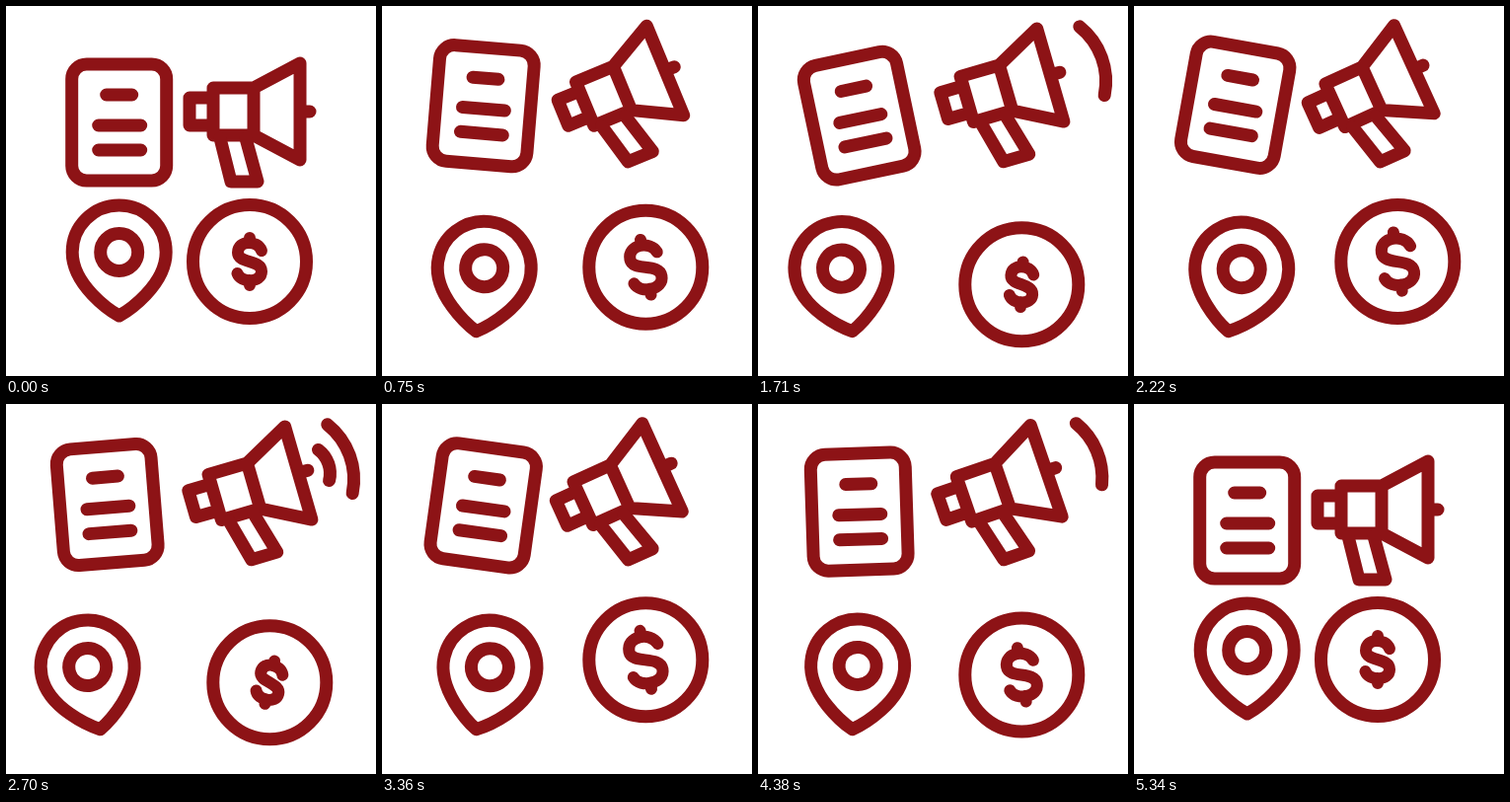
Animation of 375 by 375 pixels, one loop 5400 ms. Source, as an HTML page:

```html
<!DOCTYPE html>
<html lang="en">
<head>
<meta charset="utf-8">
<title>Marketing icons</title>
<style>
  html, body { margin: 0; width: 100%; height: 100%; overflow: hidden; background: #fff; }
  svg { display: block; width: 100vw; height: 100vh; }
  g { fill: none; stroke: #8d1316; stroke-width: 13; stroke-linecap: round; stroke-linejoin: round; }
  #sign path { vector-effect: non-scaling-stroke; stroke-width: 12; }
</style>
</head>
<body>
<svg viewBox="0 0 375 375">
  <g id="page">
    <rect x="-48" y="-59" width="96" height="118" rx="15"/>
    <path d="M-13 -28H13M-21 3H22M-21 28H22"/>
  </g>
  <g id="horn">
    <path d="M210 93H186V121H210M210 83H251V131H210ZM251 83L298 58V156L251 131M303 107H308"/>
    <path d="M217 134L228 178H255L243 134"/>
    <path id="near" d="M324 90A30 30 0 0 1 326 123" pathLength="100"/>
    <path id="far" d="M340 68A71 71 0 0 1 345 142" pathLength="100"/>
  </g>
  <g id="pin">
    <path d="M0 0C-9 -5 -47.5 -31 -47.5 -64.5A47.5 47.5 0 0 1 47.5 -64.5C47.5 -31 9 -5 0 0Z"/>
    <circle cy="-64.5" r="19"/>
  </g>
  <g id="coin">
    <circle r="57.5"/>
    <g id="sign">
      <path d="M12 -11C8 -22 -12 -22 -12 -9C-12 2 12 -2 12 10C12 22 -9 22 -12.5 12M0 -24V-19M0 19V24"/>
    </g>
  </g>
</svg>
<script>
const LOOP = 5400, STEP = 30;
const START = 460, PEAK = 1010, BEAT = 598;   // first push, first high point, half a swing
const LAST = PEAK + 5 * BEAT;                 // final low point

const el = id => document.getElementById(id);
const put = (id, value) => el(id).setAttribute('transform', value);
const clamp = p => Math.max(0, Math.min(1, p));
const ramp = (t, from, to) => (1 - Math.cos(Math.PI * clamp((t - from) / (to - from)))) / 2;

// Rises to 1, swings between 1 and -1, then dies out; tail is the half swing at the end
function swing(t, lag, tail = BEAT) {
  const peak = PEAK + lag, last = LAST + lag;
  if (t < peak) return ramp(t, START, peak);
  const wave = t < last
    ? Math.cos(Math.PI * (t - peak) / BEAT)
    : -Math.cos(Math.PI * (t - last) / tail);
  return wave * (1 - ramp(t, 4050, 5050));
}

// Arc grows from its middle before each low point, holds, then shrinks
function arc(id, t, lead, hold) {
  let size = 0;
  for (let low = PEAK + BEAT; low <= LAST; low += 2 * BEAT) {
    const age = t - low + lead;
    size = Math.max(size, Math.min(clamp(age / 90), clamp((hold + 100 - age) / 100)));
  }
  const path = el(id), len = 100 * size;
  path.style.visibility = size ? 'visible' : 'hidden';
  path.setAttribute('stroke-dasharray', `${len} 200`);
  path.setAttribute('stroke-dashoffset', len / 2 - 50);
}

function draw(t) {
  const out = ramp(t, 90, 480) - ramp(t, 4500, 5210);
  const bob = swing(t, 0, 950), sway = swing(t, -25);
  const tilt = swing(t, 120), lift = swing(t, 235), twist = swing(t, -150);

  put('page', `translate(${114.7 - 12 * out} ${118 - 14 * out - 9.4 * lift}) rotate(${12 * tilt})`);
  put('horn', `translate(${19.3 * out} ${-21.2 * out}) rotate(${-20 * out - 4.5 * bob} 231.7 173.2)`);
  put('pin', `translate(${114.7 - 19.2 * out} ${314 + 15.7 * out}) rotate(${12.5 * sway})`);
  put('coin', `translate(${247 + 20.3 * out} ${259 + 12.5 * (out - bob)})`);
  put('sign', `rotate(${-13 * twist}) scale(${1 + .08 * out + .17 * sway})`);
  arc('near', t, 320, 320);
  arc('far', t, 200, 570);
}

const begin = performance.now();
function tick() {
  const t = (performance.now() - begin) % LOOP;
  draw(Math.floor(t / STEP) * STEP);
  requestAnimationFrame(tick);
}
tick();
</script>
</body>
</html>
```
